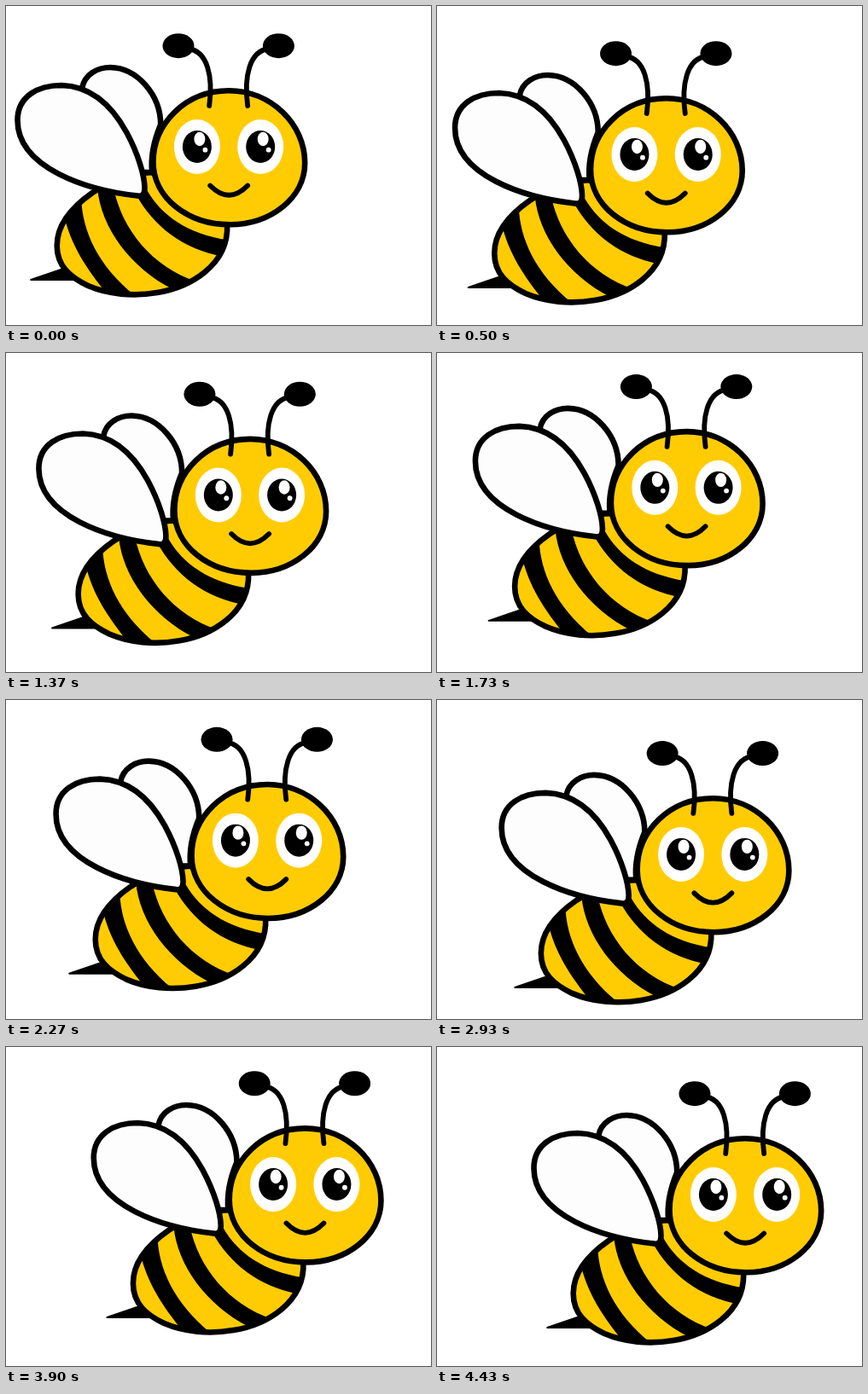
An HTML page for the animation above (5.01 s loop, 498 by 374 pixels).

```html
<!DOCTYPE html>
<html lang="en">
<head>
<meta charset="utf-8">
<title>Flying bee</title>
<style>
  html, body { margin: 0; width: 100%; height: 100%; overflow: hidden; background: #fff; }
  svg { display: block; width: 498px; height: 374px; }
  .line { stroke: #000; stroke-width: 6.6; stroke-linecap: round; stroke-linejoin: round; }
  .thin { stroke-width: 5.8; }
  .sting { stroke-width: 2; }
  .none { fill: none; }
  .yellow { fill: #ffcc03; }
  .wing { fill: #fdfdfd; }
  .white { fill: #fff; }
</style>
</head>
<body>
<svg viewBox="0.8 0 498 374">
  <defs>
    <path id="body" d="M172 195C150 196 125 204 102 219C79 235 60.5 256 60.5 281C60.5 305 76 318 97 328C120 338 150 341 178 336C215 330 262 305 260 256L200 215Z"/>
    <clipPath id="inside"><use href="#body"/></clipPath>
    <g id="eye">
      <ellipse class="white" rx="27" ry="32"/>
      <ellipse rx="17" ry="19"/>
      <ellipse class="white" cx="3" cy="-9" rx="6.5" ry="8.2"/>
      <circle class="white" cx="9.5" cy="3.7" r="2.9"/>
    </g>
    <g id="feeler">
      <path class="line thin none" d="M-48 50C-24 52 -18 84 -22.5 117"/>
      <ellipse cx="-58.7" cy="46.7" rx="18.5" ry="14.5"/>
    </g>
  </defs>
  <g id="bee">
    <path class="line sting" d="M30 321L68 308L82 321Z"/>
    <use href="#body" class="yellow"/>
    <g clip-path="url(#inside)">
      <path d="M69 246L89 225C90 265 110 307 155 342L121 340C95 308 77 281 69 246Z"/>
      <path d="M108 214C112 260 147 307 196 332L224 323C172 306 137 262 127 214Z"/>
      <path d="M153 221C174 258 207 285 256 294L264 275C215 268 184 247 166 216Z"/>
    </g>
    <use href="#body" class="line none"/>
    <path class="line wing" d="M90 96C93 80 108 72 123 72C155 72.5 182 105 182 139C174 158 170 176 172 195H150Z"/>
    <path class="line wing" d="M155 222.5C96 216 14.3 190 14.3 134C14.3 106 38 93 66 93C100 94 125 117 142 148C156 174 163 199 163.3 213Q163.5 224 155 222.5Z"/>
    <path class="line yellow" d="M262 99.3C311 99.3 351 138 351 184C351 225 311 256.3 263 256.3C214 256.3 173.3 225 173.3 183C173.3 138 211 99.3 262 99.3Z"/>
    <path class="line thin none" d="M240 210.5Q262 233 284 210.5"/>
    <use href="#feeler" transform="translate(261.5)"/>
    <use href="#feeler" transform="translate(261.5) scale(-1 1)"/>
    <use href="#eye" x="224.7" y="165"/>
    <use href="#eye" x="299" y="165"/>
  </g>
</svg>
<script>
  const LOOP = 5010, END = 4430;
  // key points: time in ms, position
  const drift = [[0, 0], [530, 8], [1070, 21], [1600, 28], [2930, 62], [3200, 75], [END, 100]];
  const bob = [[0, 0], [800, 13], [1870, -8], [2910, 16], [3520, -11], [END, 8]];

  const linear = u => u;
  const swing = u => (1 - Math.cos(Math.PI * u)) / 2;

  function at(keys, t, ease) {
    const i = Math.max(1, keys.findIndex(([time]) => time >= t));
    const [t0, a] = keys[i - 1], [t1, b] = keys[i];
    return a + (b - a) * ease((t - t0) / (t1 - t0));
  }

  const bee = document.getElementById("bee");
  const start = performance.now();

  function draw() {
    // thirty steps per second, then rest at the end
    const now = (performance.now() - start) % LOOP;
    const step = Math.floor((now + 4) * 0.03);
    const t = Math.min(step / 0.03, END);
    const x = at(drift, t, linear), y = at(bob, t, swing);
    bee.setAttribute("transform", `translate(${x.toFixed(2)} ${y.toFixed(2)})`);
    requestAnimationFrame(draw);
  }
  draw();
</script>
</body>
</html>
```
